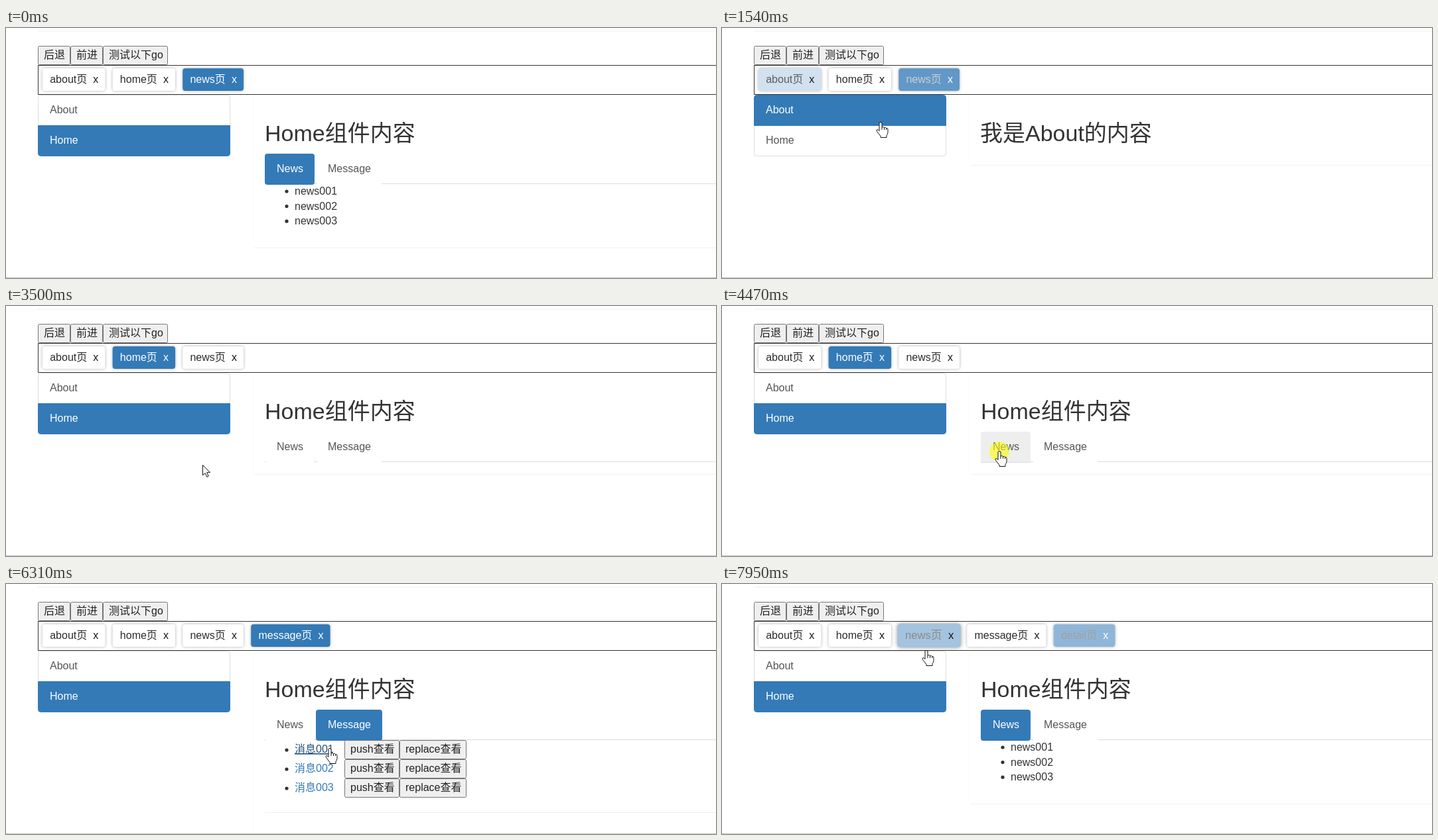
Recreate the animation shown at these times as an HTML page. Size 1070x378 px, loop 8000 ms.

```html
<!DOCTYPE html>
<html lang="zh">
<head>
<meta charset="utf-8">
<title>Router tabs</title>
<style>
html, body { margin: 0; width: 100%; height: 100%; overflow: hidden; background: #fff; }
svg { display: block; }
text { font: 16px "Liberation Sans", Arial, "Noto Sans CJK SC", "Noto Sans CJK", sans-serif; white-space: pre; }
.title { font-size: 34px; }
.tag { filter: drop-shadow(0 0 2px rgba(0, 0, 0, .32)); }
.tag.over { filter: drop-shadow(0 0 3px rgba(0, 0, 0, .42)); }
</style>
</head>
<body>
<svg id="stage" width="1070" height="378" viewBox="0 0 1070 378"></svg>
<script>
const LOOP = 8000, BLUE = '#337ab7', PRESS = 95;
const stage = document.getElementById('stage');

// Pointer strokes; some end in a click that opens a page
const enter = { start: 130, x: 883, y: 359 };
const strokes = [
  { start: 130, end: 260, x: 550, y: 254 },
  { start: 440, end: 600, x: 517, y: 275 },
  { start: 750, end: 1330, x: 239, y: 142, opens: 'about', at: 1490 },
  { start: 1620, end: 1890, x: 251, y: 223 },
  { start: 2370, end: 2620, x: 264, y: 178, opens: 'home', at: 2738 },
  { start: 2860, end: 3170, x: 263, y: 240 },
  { start: 3250, end: 4060, x: 407, y: 238 },
  { start: 4080, end: 4350, x: 418, y: 219, opens: 'news', at: 4530 },
  { start: 5110, end: 5300, x: 490, y: 230 },
  { start: 5310, end: 5450, x: 515, y: 222, opens: 'message', at: 5560 },
  { start: 5970, end: 6300, x: 488, y: 248, opens: 'detail', at: 6480 },
  { start: 6550, end: 6790, x: 45, y: 27 },
  { start: 7200, end: 7680, x: 308, y: 84, opens: 'news', at: 7870 },
  { start: 7870, end: 7950, x: 308, y: 100 }
];
const visits = [{ opens: 'news', at: -LOOP }, ...strokes.filter(s => s.opens)];

// Tags sit in a row, each as wide as its label
const ruler = document.createElement('canvas').getContext('2d');
ruler.font = '16px "Liberation Sans", Arial, "Noto Sans CJK SC", sans-serif';
let edge = 55;
const tags = ['about', 'home', 'news', 'message', 'detail'].map((name, i) => {
  const label = ruler.measureText(name + '页').width;
  const tag = { name, x: edge, w: label + 38.4, close: edge + label + 20.3 };
  tag.born = i < 3 ? -LOOP : visits.find(v => v.opens === name).at;
  edge += tag.w + 11.2;
  return tag;
});

const clamp = v => Math.max(0, Math.min(1, v));
const mix = (a, b, k) => a + (b - a) * k;
const blend = (a, b, k) => `rgb(${a.map((v, i) => Math.round(mix(v, b[i], k)))})`;
const smooth = k => k * k * (3 - 2 * k);

// cubic-bezier(.25, .1, .25, 1)
function ease(x) {
  x = clamp(x);
  let lo = 0, hi = 1;
  for (let i = 0; i < 20; i++) {
    const s = (lo + hi) / 2;
    if (.75 * s * (1 - s) + s ** 3 < x) lo = s; else hi = s;
  }
  return .3 * lo * (1 - lo) ** 2 + 3 * lo * lo * (1 - lo) + lo ** 3;
}

function pointerAt(t) {
  if (t < enter.start) return null;
  let { x, y } = enter;
  for (const s of strokes) {
    const k = smooth(clamp((t - s.start) / (s.end - s.start)));
    x = mix(x, s.x, k);
    y = mix(y, s.y, k);
  }
  return [x, y];
}

function hit(p, page, t) {
  if (!p) return '';
  const [x, y] = p;
  const within = (l, top, r, b) => x >= l && x < r && y >= top && y < b;
  for (const g of tags)
    if (t >= g.born && within(g.x, 61, g.x + g.w, 101)) return 'tag-' + g.name;
  if (within(48, 101, 338, 147)) return 'About';
  if (within(48, 147, 338, 194)) return 'Home';
  if (page !== 'about') {
    if (within(390, 190, 465, 237)) return 'News';
    if (within(467, 190, 567, 237)) return 'Message';
  }
  if (page === 'message' || page === 'detail')
    for (let i = 0; i < 3; i++)
      if (within(435, 238 + 29 * i, 493, 260 + 29 * i)) return 'link' + i;
  return '';
}

const rect = (x, y, w, h, fill, more = '') =>
  `<rect x="${x}" y="${y}" width="${w}" height="${h}" fill="${fill}" ${more}/>`;
const text = (x, y, s, fill = '#333', more = '') =>
  `<text x="${x}" y="${y}" fill="${fill}" ${more}>${s}</text>`;
const bullet = y => `<circle cx="423" cy="${y}" r="2.6" fill="#333"/>`;
const button = (x, y, w, s) =>
  rect(x + .5, y + .5, w - 1, 28, '#efefef', 'rx="2" stroke="#767676"') + text(x + 9, y + 19, s, '#222');
const three = draw => [0, 1, 2].map(draw).join('');

function drawTags(t, now, over) {
  const { opens: page, at } = visits[now];
  const last = now ? visits[now - 1].opens : '';
  const eLabel = ease((t - at) / 300), eClose = ease((t - at - 180) / 270);
  const white = [255, 255, 255];
  return tags.filter(g => t >= g.born).map(({ name, x, w, close, born }) => {
    const level = e => name === page ? (born === at ? 1 : e) : name === last ? 1 - e : 0;
    const k = level(eLabel), hot = over === 'tag-' + name, mid = x + w / 2;
    const grow = hot ? `transform="translate(${mid} 78) scale(1.04) translate(${-mid} -78)"` : '';
    return `<g ${grow}>` +
      rect(x, 61, w, 34, blend(white, [51, 122, 183], k), `rx="4" class="tag${hot ? ' over' : ''}"`) +
      text(x + 11.2, 83, name + '页', blend([44, 44, 44], white, k)) +
      text(close, 83, 'x', blend([24, 24, 24], white, level(eClose))) + '</g>';
  }).join('');
}

function drawSide(active, over) {
  const item = (name, y, shape) => {
    const on = name === active;
    const fill = on ? BLUE : over === name ? '#f5f5f5' : '#fff';
    return `<path d="${shape}" fill="${fill}" stroke="${on ? BLUE : '#ddd'}"/>` +
      text(66, y, name, on ? '#fff' : '#555');
  };
  const top = item('About', 129, 'M48.5 147.5V105.5q0-4 4-4H333.5q4 0 4 4V147.5Z');
  const low = item('Home', 175, 'M48.5 147.5H337.5V189.5q0 4-4 4H52.5q-4 0-4-4Z');
  return active === 'Home' ? top + low : low + top;
}

function drawNav(active, over) {
  const pill = (name, x, w) => {
    const on = name === active, hot = name === over;
    const back = on ? rect(x, 190, w, 47, BLUE, 'rx="4"')
      : hot ? rect(x, 190, w, 47, '#eee', 'rx="4"') + rect(x + 1, 236, w - 2, 1, '#ddd')
      : rect(x + 2, 234, w - 3, 3, '#fff');
    return back + text(x + 18, 218, name, on ? '#fff' : '#555');
  };
  return rect(390, 235, 680, 1, '#ddd') + pill('News', 390, 75) + pill('Message', 467, 100);
}

const drawNews = () => three(i =>
  bullet(247 + 22.6 * i) + text(435, 252 + 22.7 * i, 'news00' + (i + 1)));

function drawMessages(over) {
  return three(i => {
    const y = 236 + 29 * i, hot = over === 'link' + i;
    return bullet(y + 15) +
      text(435, y + 19, '消息00' + (i + 1), hot ? '#23527c' : BLUE, hot ? 'text-decoration="underline"' : '') +
      button(510, y, 83, 'push查看') + button(593, y, 101, 'replace查看');
  }) + rect(390, 345, 680, 1, '#eee');
}

function drawPanel(page, over) {
  const bottom = { about: 207, home: 254, news: 332 }[page] || 390;
  const shell = rect(372, 101, 1, bottom - 102, '#fcfcfc') + rect(374, bottom, 696, 1, '#f1f1f1');
  if (page === 'about') return shell + text(389, 171, '我是About的内容', '#333', 'class="title"');
  let s = shell + text(390, 171, 'Home组件内容', '#333', 'class="title"');
  s += drawNav({ home: '', news: 'News' }[page] ?? 'Message', over);
  if (page === 'news') s += drawNews();
  if (page === 'message' || page === 'detail') s += drawMessages(over);
  if (page === 'detail') s += bullet(379) + text(435, 384, '消息编号：001');
  return s;
}

function drawPointer(p, hand, press) {
  if (!p) return '';
  const [x, y] = p.map(Math.round);
  const d = hand
    ? 'M-2 2Q-2 .5 0 .5Q2 .5 2 2V8Q4 6.5 5.5 8.7Q7.5 7.6 8.5 9.5Q11 9 11 11.5V15.5Q11 18.5 9 20.5V23.5H0V21.5L-5.5 14.5Q-7 12-5 11.5Q-3.5 11.5-2 13.5Z M2 8V12M5.5 9V12M8.5 10V12'
    : 'M.5 .5V16L4.2 12.6L6.8 18.5L9.2 17.4L6.7 11.7H11.5Z';
  return (press ? `<circle cx="${x}" cy="${y + 1}" r="15" fill="#ff0" fill-opacity=".58"/>` : '') +
    `<path transform="translate(${x} ${y})" d="${d}" fill="#fff" stroke="#111" stroke-linejoin="round"/>`;
}

function draw(t) {
  const now = visits.filter(v => v.at <= t).length - 1;
  const page = visits[now].opens, next = visits[now + 1];
  const p = pointerAt(t), over = hit(p, page, t);
  const press = next && next.at - t < PRESS;
  stage.innerHTML =
    rect(48, 4, 1022, 1, '#eee') +
    button(48, 27, 49, '后退') + button(97, 27, 49, '前进') + button(146, 27, 98, '测试以下go') +
    rect(48.5, 56.5, 1040, 44, '#fff', 'stroke="#333"') +
    drawTags(t, now, over) +
    drawSide(page === 'about' ? 'About' : 'Home', over) +
    drawPanel(page, over) +
    rect(0, 377, 1070, 1, '#c4c4c4') +
    drawPointer(p, over !== '', press);
}

const begin = performance.now();
function tick() {
  draw((performance.now() - begin) % LOOP);
  requestAnimationFrame(tick);
}
tick();
</script>
</body>
</html>
```
